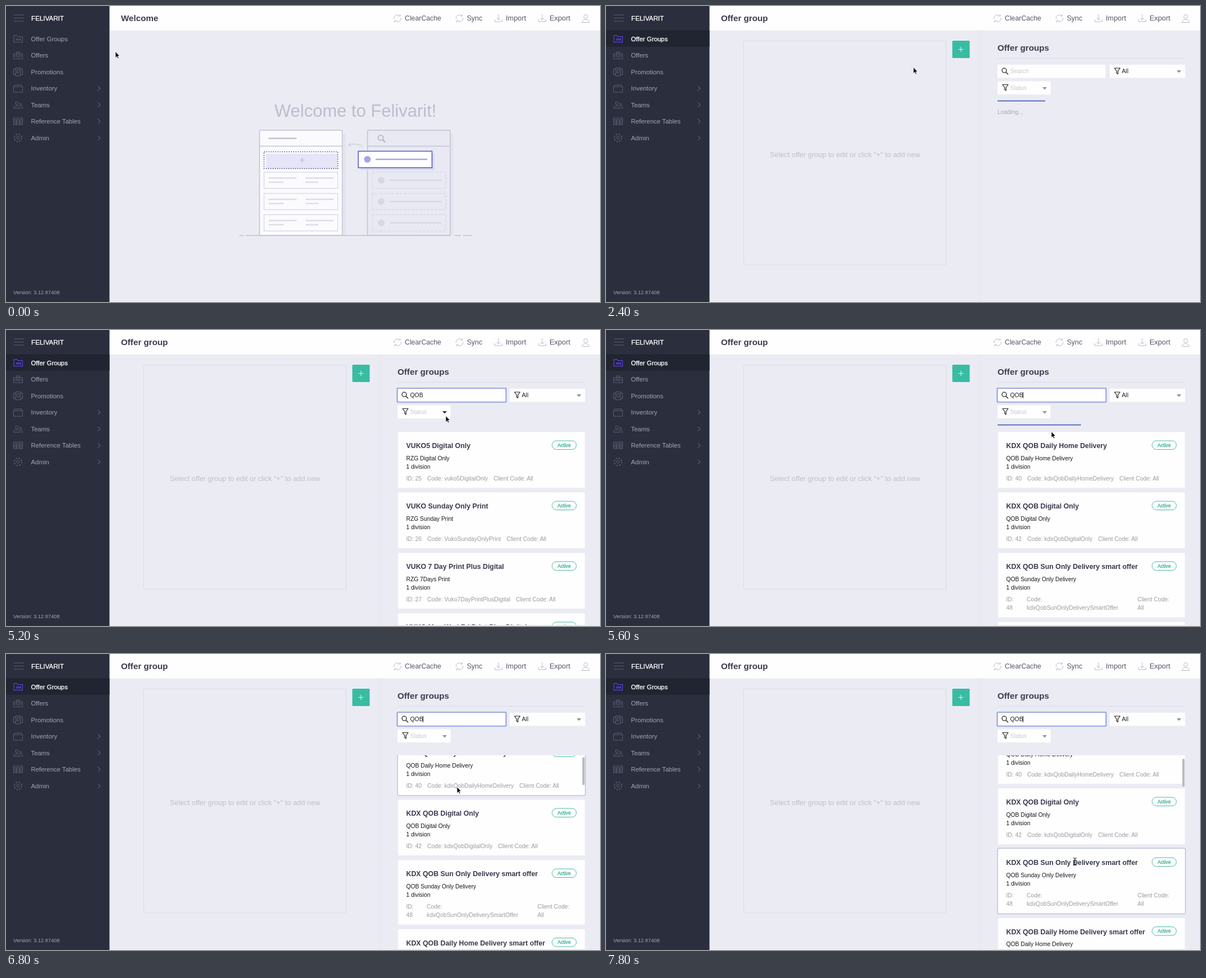
These frames come from a looping animation (1059x529 px, 8000 ms). An HTML page:

```html
<!DOCTYPE html>
<html lang="en">
<head>
<meta charset="utf-8">
<title>Offer groups</title>
<style>
html, body { margin: 0; width: 100%; height: 100%; overflow: hidden; background: #ebebf4; }
svg { display: block; width: 100%; height: 100%; }
text { font-family: "Liberation Sans", Arial, sans-serif; white-space: pre; }
.b { font-weight: bold; }
</style>
</head>
<body>
<svg id="stage" viewBox="0 0 1059 529" preserveAspectRatio="none"></svg>
<script>
const LOOP = 8000, STEP = 200;
const PAGE_AT = 1800, LIST_AT = 2800, FOCUS_AT = 3600, RESULT_AT = 5400;
const PITCH = 108, LIST_TOP = 181.5, SIDE = 184.5;

// Markup helpers
const rect = (x, y, w, h, fill, extra = '') =>
  `<rect x="${x}" y="${y}" width="${w}" height="${h}" fill="${fill}" ${extra}/>`;
const path = (d, stroke, w = 1, extra = '') =>
  `<path d="${d}" fill="none" stroke="${stroke}" stroke-width="${w}" ${extra}/>`;
const dot = (x, y, r, fill, extra = '') =>
  `<circle cx="${x}" cy="${y}" r="${r}" fill="${fill}" ${extra}/>`;
const text = (x, y, size, fill, s, extra = '') =>
  `<text x="${x}" y="${y}" font-size="${size}" fill="${fill}" ${extra}>${s}</text>`;
const group = (id, body, extra = '') => `<g id="${id}" ${extra}>${body}</g>`;
const medium = c => `stroke="${c}" stroke-width=".3"`;

// Sidebar icons, drawn around their own centre
const icons = [
  'M-7.5 6V-6H-2L0-4H8V6ZM-3 3V-1M-1 3V0H1V3M3 3V0H4.500V3',
  'M-8-3H8V6H-8ZM-3-3V-6H3V-3M-8 1H-3M3 1H8M-3 0A3 3 0 1 0 3 0A3 3 0 1 0-3 0M0-1V2',
  'M-4.500-7H4.500V7H-4.500ZM-4.500-5H-8V5H-4.500M4.500-5H8V5H4.500M-2-4H2V2H-2Z',
  'M-8-3H8V7H-8ZM-8-3L-6-6H6L8-3',
  'M-5-3A2.500 2.500 0 1 0 0-3A2.500 2.500 0 1 0-5-3M-8 6C-8 0 3 0 3 6ZM2-1A2 2 0 1 0 6-1A2 2 0 1 0 2-1M5 6H8C8 3 6 2 4 2',
  'M-8-6H8V6H-8ZM-8-3H8M-8 0H8M-8 3H8M-3-3V6M3-3V6',
  'M-2.500 0A2.500 2.500 0 1 0 2.500 0A2.500 2.500 0 1 0-2.500 0'
];
const labels = ['Offer Groups', 'Offers', 'Promotions', 'Inventory', 'Teams', 'Reference Tables', 'Admin'];

function menuItem(label, i, on) {
  const y = 58.7 + i * 29.5;
  const color = on ? '#5d41dc' : '#5b5f75';
  let icon = path(icons[i], color, on ? 1.2 : 1);
  if (i === 6) icon += dot(0, 0, 6.5, 'none', `stroke="${color}" stroke-width="1.8" stroke-dasharray="2.6 2.500"`);
  const ink = on ? '#fff' : '#a3a6b7';
  return `<g transform="translate(21.5 ${y})">${icon}</g>` +
    text(44.5, y + 4, 11.4, ink, label, medium(on ? '#fff' : 'none')) +
    (i > 2 ? path(`M164 ${y - 4}l4 4l-4 4`, '#767a8d') : '');
}

function sidebar() {
  return rect(0, 0, SIDE, 529, '#2b2e3d') +
    path('M14 16H32M14 21.5H32M14 27H32', '#5b5f75') +
    text(45, 25.7, 11.7, '#fff', 'FELIVARIT', medium('#fff')) +
    labels.map((s, i) => group('item' + i, menuItem(s, i, false))).join('') +
    group('active', rect(0, 43.5, SIDE, 29.5, '#212431') + menuItem(labels[0], 0, true)) +
    text(13, 515, 9.3, '#a3a6b7', 'Version: 3.12 87408');
}

function header() {
  const c = '#b9bac8', ink = '#55576a';
  const sync = x => path(`M${x - 6} 23A6 6 0 0 1 ${x + 4.5} 18M${x + 6} 21A6 6 0 0 1 ${x - 4.5} 26M${x + 2} 18h3v-3M${x - 2} 26h-3v3`, c);
  const down = x => path(`M${x} 15V25M${x - 3.5} 21.5l3.5 3.5l3.5-3.5M${x - 6.5} 24v4h13v-4`, c);
  return rect(SIDE, 0, 875, 43.5, '#fefefe') +
    text(205, 27.2, 15.2, '#3a3c4f', '', 'id="title" class="b"') +
    sync(698) + text(711, 26, 12.3, ink, 'ClearCache') +
    sync(808.5) + text(821.5, 26, 12.5, ink, 'Sync') +
    down(878) + text(891, 26, 12.8, ink, 'Import') +
    down(956) + text(969, 26, 12.8, ink, 'Export') +
    dot(1033.5, 19, 3.5, 'none', `stroke="${c}"`) +
    path('M1027 29.5C1027 22.500 1040 22.500 1040 29.500Z', c);
}

function welcome() {
  const line = '#c2c2d1', pale = '#dcdce8';
  const bar = (x, y, w, c = pale) => path(`M${x} ${y}h${w}`, c, 2.5);
  let s = text(623, 198, 31, '#bdbdcd', 'Welcome to Felivarit!', 'text-anchor="middle"') +
    rect(600, 229, 6, 181, '#e4e4ef') + rect(792, 229, 6, 181, '#e4e4ef') +
    rect(452, 222, 147.5, 188, '#fbfbfe', `stroke="${line}" stroke-width="1.5" rx="2"`) +
    rect(644.5, 222, 147.5, 188, '#e9e9f3', `stroke="${line}" stroke-width="1.5" rx="2"`) +
    path('M452 250.5H599.500M644.500 250.500H792', line, 1.5) +
    bar(468, 236.5, 50, line) +
    dot(668, 235.5, 4.5, 'none', 'stroke="#bdbdcd" stroke-width="2"') +
    path('M671.5 239L676 243.500', '#bdbdcd', 2.5) +
    path('M636 252C630 246 621 246 611 248M615 244.500L610.500 248L615 251', line);
  for (let i = 0; i < 3; i++) {
    const y = 297 + i * 38;
    s += rect(460, y, 131.5, 29, '#fbfbfe', `stroke="${pale}" stroke-width="1.5"`) +
      bar(468, y + 10.5, 50) + bar(468, y + 18, 27) + bar(534, y + 10.5, 50) + bar(534, y + 18, 23) +
      rect(653, y, 131, 29, 'none', `stroke="${pale}" stroke-width="1.5" stroke-dasharray="5 2"`) +
      dot(669, y + 14.5, 6, '#d8d8e5') + bar(684, y + 14.5, 92, '#d8d8e5');
  }
  return s + rect(464, 264, 127, 27, '#e5e5f7') +
    rect(460, 260.5, 131.5, 30, 'none', 'stroke="#454b96" stroke-width="1.6" stroke-dasharray="1.6 2.4"') +
    path('M523.5 275.500h9M528 271v9', '#b5b5cc', 1.2) +
    rect(632, 263, 131.5, 30, '#d9d9ec') +
    rect(628, 259.5, 131.5, 29.5, '#fefefe', 'stroke="#5c69bf" stroke-width="1.7"') +
    dot(644.3, 274, 6, '#a2a6e8') + bar(659, 274, 92, '#a2a6e8') +
    path('M416 410.2h8M428 410.200H792M800 410.200h11M815 410.200h16', line, 1.6);
}

function funnel(x, y) {
  return path(`M${x} ${y}h10l-3.800 5v5.500l-2.400-1.800v-3.700Z`, '#222', 1.2, 'stroke-linejoin="round"');
}
const arrow = (x, y, id) => `<path id="${id}" d="M${x} ${y}h8l-4 4.500Z" fill="#909097"/>`;

function groupsPage() {
  const dash = 'stroke-dasharray="1.5 1"';
  return path('M667.5 44V529', '#dfdfe9', 1, dash) +
    rect(245.5, 62.5, 361, 400.5, 'none', `stroke="#cfcfdb" rx="2" ${dash}`) +
    text(426, 270, 12.75, '#c0c0ca', 'Select offer group to edit or click "+" to add new', 'text-anchor="middle"') +
    rect(617.4, 62, 31, 31, '#39bca2', 'rx="1.5"') + path('M628.4 77.500h9M632.900 73v9', '#d9f5ee', 1.1) +
    text(698, 80, 15.2, '#3a3c4f', 'Offer groups', 'class="b"') +
    path('M698 93.5H1033', '#cfcfdb', 1, dash) +
    rect(698, 105, 192.5, 23.5, '#fefefe') +
    group('focus', rect(696.5, 103, 196, 27, 'none', 'stroke="#d3daf5" stroke-width="1.6" rx="2"') +
      rect(697.6, 104.2, 193.8, 24.6, '#fefefe', 'stroke="#6273c6" stroke-width="1.1" rx="1"')) +
    dot(710, 115.2, 4, 'none', 'stroke="#222" stroke-width="1.3"') + path('M713 118.2l4 4', '#222', 1.5) +
    text(720.5, 120.4, 10.4, '#c8c8cf', '', 'id="query"') +
    path('M743.5 111v11', '#222', 1, 'id="caret"') +
    rect(898, 105, 134.5, 23.5, '#fefefe') + funnel(906.5, 111) +
    text(919.5, 120.4, 10.6, '#222', 'All') + arrow(1017.5, 115, 'allArrow') +
    rect(698, 134.5, 94.5, 23.5, '#fefefe') + funnel(707, 140.5) +
    text(720.5, 150.4, 10.4, '#c8c8cf', 'Status') + arrow(778, 145, 'statusArrow') +
    rect(698, 168.7, 0, 1.8, '#4b66b5', 'id="progress"') +
    text(698, 192.6, 10.4, '#a9a9b4', 'Loading...', 'id="loading"') +
    `<g clip-path="url(#listClip)">${group('all', cards(allOffers))}${group('found', cards(foundOffers))}` +
    rect(698, 0, 335, 0, 'none', 'id="hover" stroke="#a9b2d8" rx="2"') + '</g>' +
    rect(1027.5, 0, 4, 50, '#b9b9bd', 'id="thumb" rx="2"');
}

// Offers: title, subtitle, id, code
const allOffers = [
  ['VUKO5 Digital Only', 'RZG Digital Only', 25, 'vuko5DigitalOnly'],
  ['VUKO Sunday Only Print', 'RZG Sunday Print', 26, 'VukoSundayOnlyPrint'],
  ['VUKO 7 Day Print Plus Digital', 'RZG 7Days Print', 27, 'Vuko7DayPrintPlusDigital'],
  ['VUKO Mon Wed Fri Print Plus Digital', 'RZG Mon Wed Fri', 28, 'VukoMonWedFri']
];
const foundOffers = [
  ['KDX QOB Daily Home Delivery', 'QOB Daily Home Delivery', 40, 'kdxQobDailyHomeDelivery'],
  ['KDX QOB Digital Only', 'QOB Digital Only', 42, 'kdxQobDigitalOnly'],
  ['KDX QOB Sun Only Delivery smart offer', 'QOB Sunday Only Delivery', 48, 'kdxQobSunOnlyDeliverySmartOffer'],
  ['KDX QOB Daily Home Delivery smart offer', 'QOB Daily Home Delivery', 49, 'kdxQobDailyHomeDeliverySmartOffer']
];
const isTall = o => o[3].length > 28;
const cardHeight = o => isTall(o) ? 116.5 : 101;

function cardTop(list, n) {
  return list.slice(0, n).reduce((y, o) => y + cardHeight(o) + PITCH - 101, LIST_TOP);
}

function cards(list) {
  return list.map((o, i) => {
    const [title, sub, id, code] = o, grey = '#9b9ba3', size = 10.35;
    const pair = (x, a, b) => text(x, 87, size, grey, a) + text(x, 102.5, size, grey, b);
    const gap = s => `<tspan dx="10">${s}</tspan>`;
    const meta = isTall(o)
      ? pair(15.5, 'ID:', id) + pair(52, 'Code:', code) + pair(249.5, 'Client Code:', 'All')
      : text(15.5, 87, size, grey, `ID: ${id}${gap('Code: ' + code)}${gap('Client Code: All')}`);
    return `<g transform="translate(698 ${cardTop(list, i)})">` +
      rect(0.5, 0.5, 334, cardHeight(o) - 0.5, '#fefefe', 'stroke="#e6e6ef" stroke-width=".6" rx="2"') +
      text(15.5, 29.5, 12.35, '#383a4c', title, 'class="b"') +
      text(15.5, 51, 10.3, '#17171d', sub) + text(15.5, 66.5, 10.3, '#17171d', '1 division') + meta +
      rect(275.5, 16.5, 43.3, 15.5, '#fefefe', 'stroke="#4bb9a2" rx="7.75"') +
      text(297, 27.2, 8.6, '#36b095', 'Active', 'text-anchor="middle" ' + medium('#36b095')) + '</g>';
  }).join('');
}

const stage = document.getElementById('stage');
stage.innerHTML =
  '<defs><clipPath id="listClip"><rect x="697" y="181" width="337" height="346"/></clipPath></defs>' +
  rect(SIDE, 0, 875, 529, '#ebebf4') + group('welcome', welcome()) + group('groups', groupsPage()) +
  header() + sidebar() +
  group('pointer', '<path d="M0-.5V10.500L2.500 8.300L4.200 12L6 11.200L4.400 7.500H7.700Z" fill="#000" stroke="#fff" stroke-width=".8"/>') +
  group('beam', path('M-3-6.500Q0-6.500 0-4.500Q0-6.500 3-6.500M0-5V5M-3 6.500Q0 6.500 0 4.500Q0 6.500 3 6.500M-1.500 1.500h3', '#222', 1.1));

const $ = id => document.getElementById(id);
const show = (id, on) => $(id).setAttribute('display', on ? 'inline' : 'none');
const set = (id, name, v) => $(id).setAttribute(name, v);

// Keys: [time, value, value...], linear between them
const cursorKeys = [[0, 195, 82], [200, 178, 78], [800, 86, 62], [1400, 82, 60], [1800, 240, 82],
  [2400, 548, 110], [2800, 700, 122], [3200, 769, 126], [4800, 769, 126], [5200, 784, 154],
  [5600, 794, 182], [6000, 803, 232], [6800, 804, 238], [7200, 812, 290], [7600, 834, 366], [7800, 836, 371]];
const scrollKeys = [[6200, 0], [6800, 30], [7200, 50]];

function at(keys, t) {
  const n = keys.findIndex(k => k[0] > t);
  if (n < 0) return keys[keys.length - 1].slice(1);
  if (n === 0) return keys[0].slice(1);
  const a = keys[n - 1], b = keys[n], p = (t - a[0]) / (b[0] - a[0]);
  return a.slice(1).map((v, i) => v + (b[i + 1] - v) * p);
}

function render(t) {
  const [x, y] = at(cursorKeys, t), [scroll] = at(scrollKeys, t);
  const onPage = t >= PAGE_AT, focused = t >= FOCUS_AT, found = t >= RESULT_AT;
  $('title').textContent = onPage ? 'Offer group' : 'Welcome';
  show('welcome', !onPage);
  show('groups', onPage);
  show('active', onPage || (x < SIDE && y > 44 && y < 73));

  const typed = 'QOB'.slice(0, Math.max(0, Math.floor((t - 3800) / 300)));
  $('query').textContent = typed || 'Search';
  set('query', 'fill', typed ? '#222' : '#c8c8cf');
  show('focus', focused);
  show('caret', focused && t % 1000 >= 500);
  set('caret', 'transform', `translate(${typed ? (typed.length - 3) * 7.6 : -23} 0)`);
  set('statusArrow', 'fill', x > 698 && x < 793 && y > 134 && y < 158 ? '#33333a' : '#909097');

  const start = found ? 5250 : 2200;
  const busy = t < LIST_AT || (found && t < 6000);
  set('progress', 'width', busy ? Math.min(335, Math.max(0, t - start) * 0.425) : 0);
  show('loading', t < LIST_AT);
  show('all', t >= LIST_AT && !found);
  show('found', found);
  set('found', 'transform', `translate(0 ${-scroll})`);
  show('thumb', scroll > 0);
  set('thumb', 'y', 180 + scroll * 0.145);

  const hit = foundOffers.findIndex((o, i) => {
    const top = cardTop(foundOffers, i) - scroll;
    return y > top && y < top + cardHeight(o);
  });
  show('hover', found && y > 184 && hit >= 0);
  if (hit >= 0) {
    set('hover', 'y', cardTop(foundOffers, hit) - scroll - 0.5);
    set('hover', 'height', cardHeight(foundOffers[hit]) + 1);
  }

  const overText = (x > 698 && x < 890 && y > 105 && y < 128) || t >= 7600;
  const hidden = t >= 4200 && t < 4800;
  show('pointer', !overText && !hidden);
  show('beam', overText && !hidden);
  for (const id of ['pointer', 'beam']) set(id, 'transform', `translate(${x} ${y})`);
}

function tick() {
  const t = performance.now() % LOOP;
  render(Math.floor(t / STEP) * STEP);
  requestAnimationFrame(tick);
}
tick();
</script>
</body>
</html>
```
